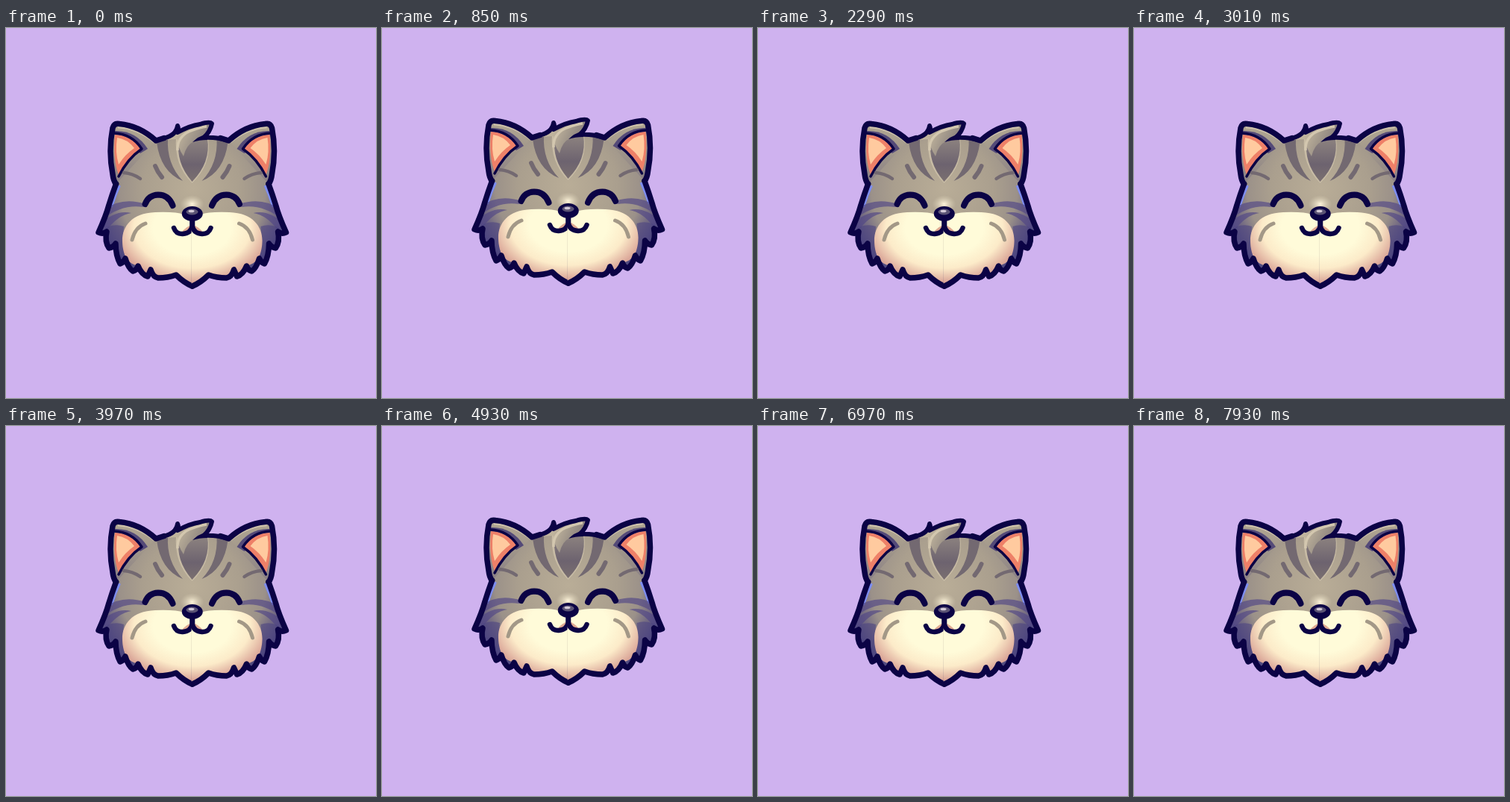
An HTML page that plays this animation: 496x496 px, repeating every 8 s.

```html
<!DOCTYPE html>
<html lang="en">
<head>
<meta charset="utf-8">
<title>Bobbing cat</title>
<style>
  html, body { margin: 0; width: 100%; height: 100%; overflow: hidden; background: #cfb2ef; }
  svg { display: block; width: 100%; height: 100%; }
  .line { fill: none; stroke: #0b0345; stroke-linecap: round; stroke-linejoin: round; }
  .stripe { fill: none; stroke: #736971; stroke-linecap: round; }
</style>
</head>
<body>
<svg viewBox="0 0 496 496">
  <defs>
    <radialGradient id="fur" gradientUnits="userSpaceOnUse" cx="249.5" cy="215" r="132">
      <stop offset="0" stop-color="#b9ad97"/>
      <stop offset=".5" stop-color="#aa9f8e"/>
      <stop offset=".74" stop-color="#9b9189"/>
      <stop offset=".88" stop-color="#716882"/>
      <stop offset="1" stop-color="#504a80"/>
    </radialGradient>
    <radialGradient id="cream" gradientUnits="userSpaceOnUse" cx="249.5" cy="268" r="104"
      gradientTransform="translate(0 80) scale(1 .7)">
      <stop offset=".5" stop-color="#fffbd9"/>
      <stop offset=".75" stop-color="#fcebc9"/>
      <stop offset="1" stop-color="#dba799"/>
    </radialGradient>
    <radialGradient id="glow">
      <stop offset="0" stop-color="#fff6dc"/>
      <stop offset="1" stop-color="#d9ceb4" stop-opacity="0"/>
    </radialGradient>
    <linearGradient id="ear" gradientUnits="userSpaceOnUse" x1="170" y1="128" x2="160" y2="205">
      <stop offset="0" stop-color="#b3a893"/>
      <stop offset=".5" stop-color="#a0968a"/>
      <stop offset="1" stop-color="#8b8186"/>
    </linearGradient>
    <linearGradient id="center" x2="0" y2="1">
      <stop offset="0" stop-color="#8d8380"/>
      <stop offset=".6" stop-color="#6d636f"/>
      <stop offset="1" stop-color="#7a6f70"/>
    </linearGradient>
    <linearGradient id="lock" gradientUnits="userSpaceOnUse" x1="232" y1="140" x2="268" y2="158">
      <stop offset="0" stop-color="#c0b49d"/>
      <stop offset=".5" stop-color="#a0968a"/>
      <stop offset="1" stop-color="#857b7b"/>
    </linearGradient>
    <path id="jaw" d="M147.500 209Q142 224 138 237Q134 252 124 274Q130 277 135 273Q132 286 138 295Q144 294 147 289
      Q147 305 153 316Q158 314 160 309Q164 322 170 326Q175 325 177 319Q182 331 190 333L194 324
      Q197 334 204 335Q217 335 228 331Q238 341 249.500 346"/>
    <clipPath id="head">
      <path d="M251 145Q220 145 201 151L147.500 209Q142 224 138 237Q134 252 124 274Q130 277 135 273Q132 286 138 295
        Q144 294 147 289Q147 305 153 316Q158 314 160 309Q164 322 170 326Q175 325 177 319Q182 331 190 333L194 324
        Q197 334 204 335Q217 335 228 331Q238 341 251 347Z"/>
    </clipPath>

    <g id="half">
      <path fill="url(#ear)" d="M203 151Q179 131 152 128Q145 127 143 134Q137 165 143 196L148 212L190 212L215 165Z"/>
      <g clip-path="url(#head)">
        <path fill="url(#fur)" d="M110 120H270V350H110Z"/>
        <path fill="none" stroke="#7d8df0" stroke-width="4" d="M152 211Q146 224 141 240"/>
        <path fill="#504686" d="M132 243Q156 226 187 236Q188 240 183 240Q156 236 130 256Z" opacity=".65"/>
        <path fill="#504686" d="M126 264Q146 243 168 248Q150 251 136 270Z" opacity=".65"/>
        <path fill="#4b4480" d="M122 276Q140 260 158 266L156 293L172 323L150 318Z" opacity=".6"/>
        <path fill="#736971" d="M202 153Q209 148 217 148Q215 182 237 205Q207 193 202 153Z"/>
        <path fill="url(#cream)" d="M270 256H251L238 250Q228 246 200 247C167 248 155 268 156 287C157 306 163 316 178 319
          L190 334L194 322L200 335Q216 335 228 331L251 347H270Z"/>
      </g>
      <path fill="none" stroke="#cfc3ab" stroke-width="3" d="M150 133Q176 134 199 153"/>
      <path fill="#544a78" d="M146 138Q174 137 190 162L180 168L146 145Z"/>
      <path fill="#ee8068" d="M146 143Q168 144 181 162Q161 176 151 197Q143 176 146 143Z"/>
      <path fill="#ffca9f" d="M149 147Q163 149 172 161Q160 169 151 183Q146 166 149 147Z"/>
      <path class="line" stroke-width="3.500" d="M145 141Q169 142 182 162Q163 175 151 199"/>
      <path class="stripe" stroke-width="4.500" d="M158 194Q170 195 180 202"/>
      <path class="stripe" stroke-width="6" d="M200 185Q203 193 209 200"/>
      <path class="line" stroke-width="7.500" d="M212 147.500L201 151Q179 131 152 128.500Q145 127 143 134Q137 165 143 196
        Q144 205 147.500 209"/>
      <use href="#jaw" class="line" stroke-width="7.500"/>
      <path fill="none" stroke="#a39887" stroke-width="5" stroke-linecap="round" d="M169 284Q173 267 187 262"/>
      <path class="line" stroke-width="8" d="M186.500 236Q191 224 204 223.500Q218 223.500 223.500 238"/>
      <path fill="#dfa991" d="M236 273Q242 266 249.500 264Q248 276 236 275Z"/>
      <path class="line" stroke-width="6.500" d="M225 268Q228 276.500 237 276Q248 275 249.500 266V256"/>
    </g>
  </defs>

  <g id="cat">
    <use href="#half"/>
    <use href="#half" transform="translate(499.500 0) scale(-1 1)"/>
    <ellipse cx="249.500" cy="236" rx="16" ry="12" fill="url(#glow)"/>
    <path fill="#c8bca5" d="M228 146Q225 184 249.500 208Q276 183 271 148Z"/>
    <path fill="url(#center)" d="M232 151Q227 180 249.500 206Q275 180 270 148Z"/>
    <path fill="url(#lock)" d="M212 150Q228 144 230 132Q232 135 231 141Q245 131 262 129Q272 126 276 128Q274 139 265 148
      L252 152Q242 156 238 172Q230 160 230 149Z"/>
    <path fill="none" stroke="#d3c7af" stroke-width="3.500" d="M230 164Q229 146 247 138Q260 133 269 132"/>
    <path fill="#0b0345" d="M267 143Q258 145 250 153Q259 150 270 150Z"/>
    <path class="line" stroke-width="6" d="M212 147.500Q228 144 230 131Q232 135 230 140Q246 131 260 129Q273 125 276 128
      Q274 139 265 147Q282 146 298 151"/>
    <ellipse cx="249.750" cy="249" rx="14" ry="10" fill="#0b0345"/>
    <ellipse cx="249.500" cy="246.500" rx="8" ry="4" fill="#5b5475"/>
    <ellipse cx="248.500" cy="245.500" rx="4" ry="1.800" fill="#d4cbd8"/>
  </g>
</svg>
<script>
  const LOOP = 8000, FIRST_BOB = 730, STEP = 120, STEPS_PER_BOB = 7, HEIGHT = 4;
  const cat = document.getElementById('cat');
  const start = performance.now();

  // After a short rest the head hops for three steps of every seven.
  function lift(time) {
    if (time < FIRST_BOB) return 0;
    const step = Math.floor((time - FIRST_BOB) / STEP) % STEPS_PER_BOB;
    return HEIGHT * Math.max(0, 1 - Math.abs(step - 1) / 2);
  }

  function draw() {
    const time = (performance.now() - start) % LOOP;
    cat.setAttribute('transform', `translate(0 ${-lift(time)})`);
    requestAnimationFrame(draw);
  }
  draw();
</script>
</body>
</html>
```
